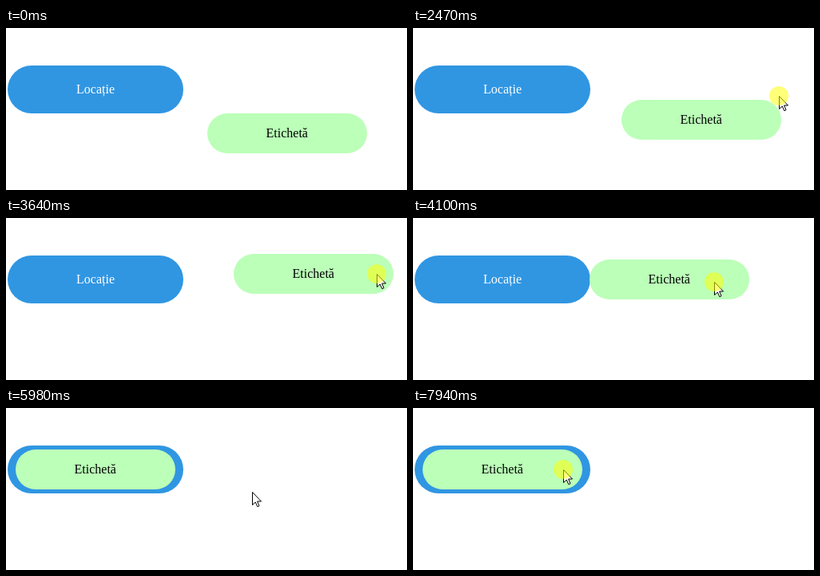
An HTML page for the animation above (8 s loop, 502x203 px).

```html
<!DOCTYPE html>
<html lang="ro">
<head>
<meta charset="utf-8">
<title>Drag and drop</title>
<style>
html, body { margin: 0; width: 100%; height: 100%; overflow: hidden; background: #fff; }
svg { display: block; width: 502px; height: 203px; }
text { font: 16px "Liberation Serif", "Times New Roman", serif; text-anchor: middle; }
</style>
</head>
<body>
<svg viewBox="0 0 502 203">
  <rect x="2" y="47" width="220" height="60" rx="30" fill="#3096e2"/>
  <text x="112" y="82" fill="#fff">Locație</text>
  <g id="label">
    <rect width="200" height="50" rx="25" fill="#bbffb8"/>
    <text x="99.75" y="30">Etichetă</text>
  </g>
  <g id="pointer">
    <path d="M.5 .5V16.5L4.3 13L6.8 18.7L9 17.7L6.6 12H11.5Z" fill="#fff" stroke="#000"/>
    <circle id="press" r="12" fill="#ff0" fill-opacity=".53"/>
  </g>
</svg>
<script>
const LOOP = 8000, STEP = 78;
const $ = id => document.getElementById(id);

// Each move: start time, number of steps, end x, end y
const pointer = {
  home: [433, 210],
  moves: [
    [770, 3, 395, 143], [1070, 3, 361, 136], [1370, 1, 432, 132], // come in
    [2230, 4, 458, 85], [2542, 2, 464, 70], [3718, 8, 336, 84],   // drag
    [4490, 5, 318, 98], [5030, 2, 313, 101], [5980, 1, 308, 105], // let go
    [6058, 10, 208, 146], [6830, 6, 188, 77]                      // return
  ]
};
const label = {
  home: [252, 107],
  moves: [[2230, 4, 261, 90], [2542, 2, 285, 45], [3718, 10, 157, 59], [4490, 5, 12, 52]]
};

const smooth = u => u * u * (3 - 2 * u);

function position({ home, moves }, t) {
  let [x, y] = home;
  for (const [start, steps, toX, toY] of moves) {
    if (t < start) break;
    const done = Math.min(Math.floor((t - start) / STEP) + 1, steps);
    const e = smooth(done / steps);
    x += (toX - x) * e;
    y += (toY - y) * e;
  }
  return [Math.round(x), Math.round(y)];
}

function place(id, track, t) {
  $(id).setAttribute("transform", `translate(${position(track, t)})`);
}

function draw(now) {
  const t = now % LOOP;
  place("label", label, t);
  place("pointer", pointer, t);
  const down = (t >= 2080 && t < 4490) || t >= 7700;
  $("press").setAttribute("visibility", down ? "visible" : "hidden");
}

let origin;
function frame(now) {
  origin ??= now;
  draw(now - origin);
  requestAnimationFrame(frame);
}
draw(0);
requestAnimationFrame(frame);
</script>
</body>
</html>
```
